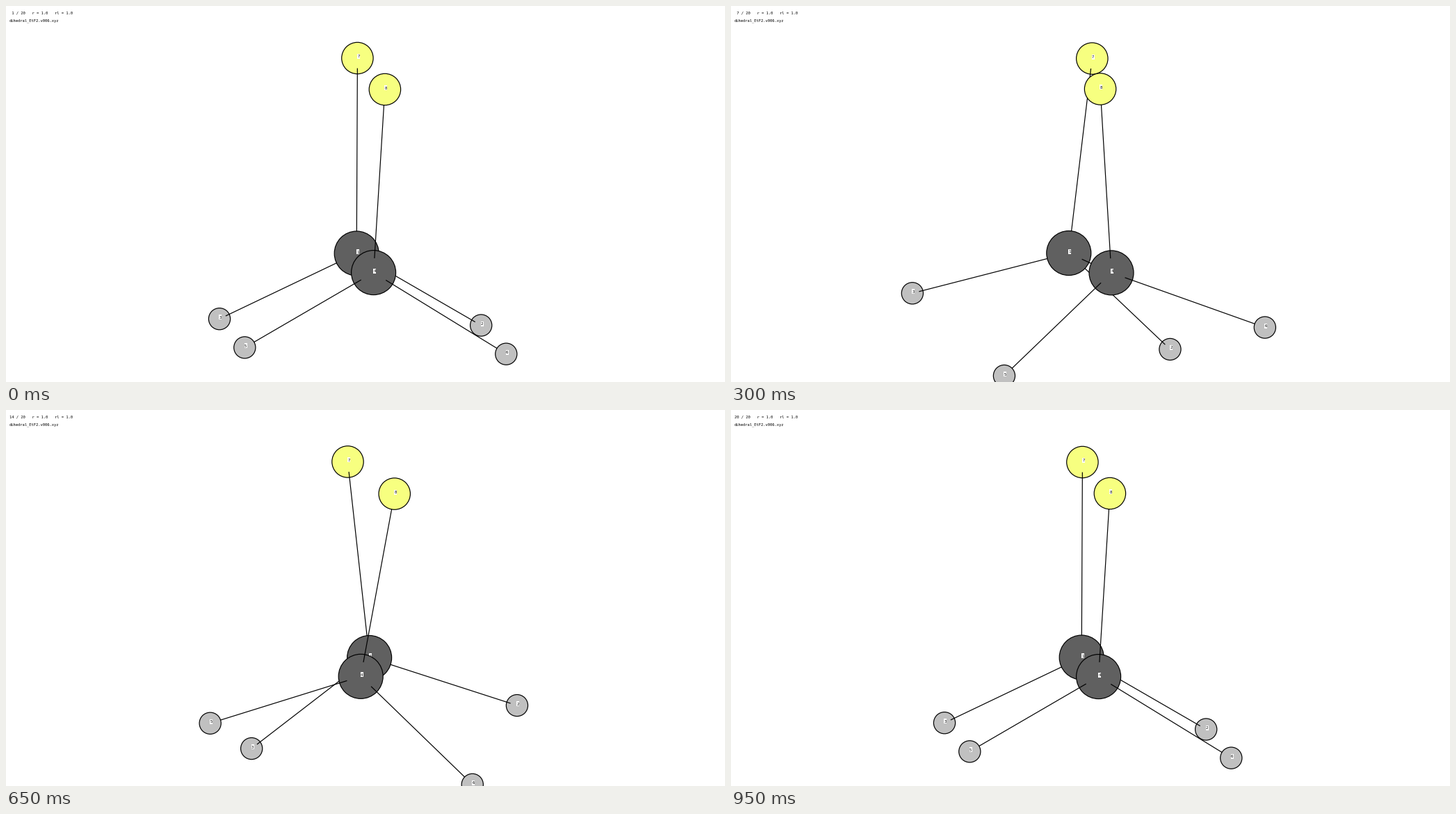
A matplotlib script that plays this animation: 1034 px wide and 541 px high, repeating every 1 s.

```python
import numpy as np
import matplotlib.pyplot as plt
from matplotlib.animation import FuncAnimation
from matplotlib.patches import Circle, Rectangle

W, H, DPI = 1034, 541, 100
STEPS, LOOP_MS = 20, 1000
PX = 72 / DPI
CARBON, HYDROGEN, FLUORINE = (32, "#606060"), (15.6, "#c0c0c0"), (22.7, "#f7ff80")

# atom: (kind, rest position, vibration amplitude)
ATOMS = {
    1: (CARBON, (504.2, 356.0), (-20.1, -0.5)),
    2: (HYDROGEN, (683.2, 459.5), (-56.5, 37.6)),
    3: (HYDROGEN, (307.0, 450.2), (-50.4, -40.3)),
    4: (CARBON, (528.6, 383.6), (20.1, 0.3)),
    5: (HYDROGEN, (343.3, 491.4), (54.2, 44.4)),
    6: (HYDROGEN, (719.3, 500.7), (53.0, -41.7)),
    7: (FLUORINE, (505.4, 75.0), (15.2, 0.6)),
    8: (FLUORINE, (544.9, 120.0), (-15.1, -0.6)),
}
# back to front: single numbers are atoms, pairs are bonds
LAYERS = [2, 3, 7, (1, 2), (1, 3), (1, 7), 1, (1, 4), 4, (4, 5), (4, 6), (4, 8), 5, 6, 8]

fig = plt.figure(figsize=(W / DPI, H / DPI), dpi=DPI, facecolor="white")
ax = fig.add_axes([0, 0, 1, 1])
ax.set(xlim=(0, W), ylim=(H, 0))
ax.axis("off")


def write(x, y, s, z=50, ha="left"):
    return ax.text(x, y, s, family="DejaVu Sans Mono", size=5.46 * PX,
                   color="black", ha=ha, va="baseline", zorder=z)


def make_atom(n, z):
    (r, color), pos, _ = ATOMS[n]
    disc = ax.add_patch(Circle(pos, r, fc=color, ec="black", lw=1.2 * PX, zorder=z))
    box = ax.add_patch(Rectangle(pos, 4, 7, fc="white", lw=0, zorder=z + 0.1))
    return disc, box, write(*pos, str(n), z + 0.2, "center")


def make_bond(z):
    return ax.plot([], [], color="black", lw=1.2 * PX, zorder=z)[0]


header = write(5, 11, "")
write(5, 22, "dihedral_EtF2.v006.xyz")
parts = {key: make_atom(key, z) if isinstance(key, int) else make_bond(z)
         for z, key in enumerate(LAYERS, 1)}


def update(i):
    swing = np.sin(2 * np.pi * i / (STEPS - 1))
    pos = {n: np.add(rest, np.multiply(amp, swing)) for n, (_, rest, amp) in ATOMS.items()}
    for key, part in parts.items():
        if isinstance(key, int):
            disc, box, label = part
            x, y = pos[key]
            disc.center = x, y
            box.set_xy((x - 0.6, y - 6))
            label.set_position((x + 1.4, y - 0.5))
        else:
            a, b = key
            d = pos[b] - pos[a]
            d /= np.hypot(*d)
            # bonds stop two thirds of a radius away from each centre
            p = pos[a] + d * ATOMS[a][0][0] * 2 / 3
            q = pos[b] - d * ATOMS[b][0][0] * 2 / 3
            part.set_data([p[0], q[0]], [p[1], q[1]])
    header.set_text(f"{i + 1:2d} / {STEPS}   r = 1.0   rl = 1.0")
    return []


anim = FuncAnimation(fig, update, frames=STEPS, interval=LOOP_MS / STEPS,
                     repeat=True, repeat_delay=0)
plt.show()
```
